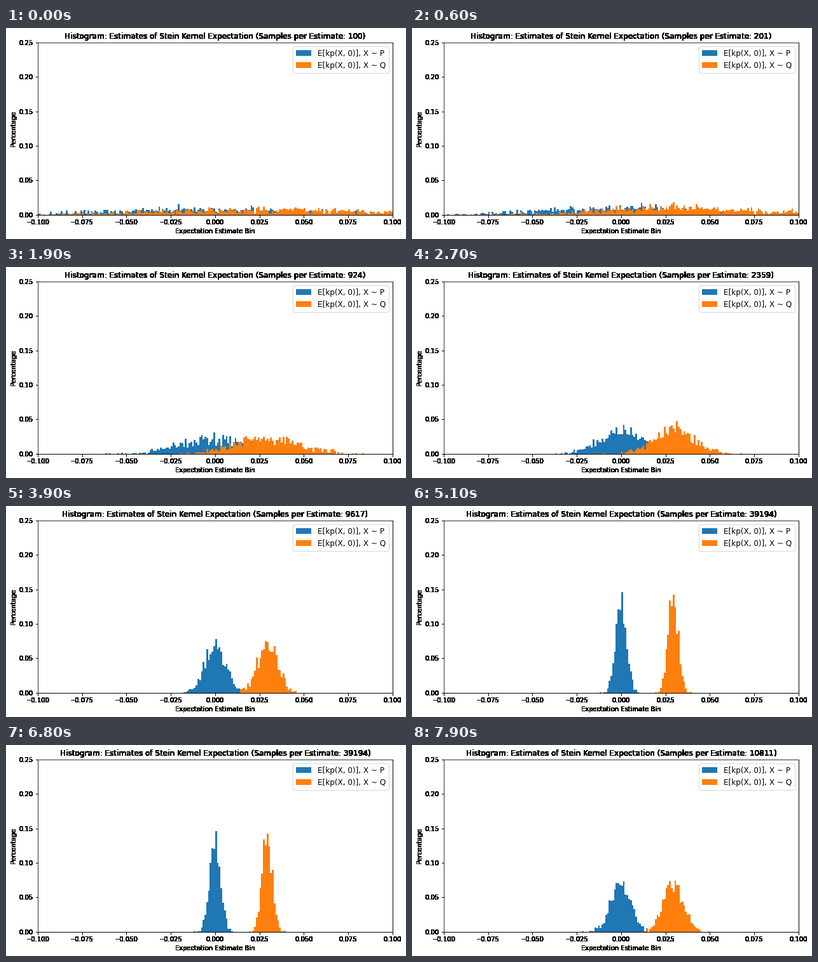
These frames come from a looping animation (629 px wide and 333 px high, 8 s). A matplotlib script:

```python
import numpy as np
import matplotlib.pyplot as plt
from matplotlib.animation import FuncAnimation

WIDTH, HEIGHT, DPI = 629, 333, 72
STEPS, FRAMES, INTERVAL = 60, 80, 100
ESTIMATES = 1000
EDGES = np.linspace(-0.1, 0.1, 201)
SAMPLES = np.logspace(2, 5, STEPS).astype(int)
# mean of the estimates, spread of a single sample
SERIES = {"P": (0.0, 0.585), "Q": (0.0294, 0.565)}

plt.rcParams.update({"font.family": "DejaVu Sans", "font.size": 10})


def harden(image, dpi):
    """Turn every touched pixel solid black."""
    hard = np.zeros_like(image)
    hard[..., 3] = image[..., 3] > 0
    return hard, 0, 0


def histogram(rng, mean, spread, samples):
    estimates = rng.normal(mean, spread / np.sqrt(samples), ESTIMATES)
    return np.histogram(estimates, EDGES)[0] / ESTIMATES


fig = plt.figure(figsize=(WIDTH / DPI, HEIGHT / DPI), dpi=DPI, facecolor="white")
ax = fig.add_axes([49.85 / WIDTH, 38.2 / HEIGHT, 558 / WIDTH, 271.8 / HEIGHT])
ax.set(xlim=(-0.1, 0.1), ylim=(0, 0.25),
       xlabel="Expectation Estimate Bin", ylabel="Percentage")
title = ax.set_title("")
bars = [ax.stairs(np.zeros(200), EDGES, fill=True, label=f"E[kp(X, 0)], X ~ {name}")
        for name in SERIES]
ax.legend(loc="upper right", fontsize=12)

for artist in (title, ax.xaxis, ax.yaxis, ax.spines["right"], ax.spines["bottom"]):
    artist.set_agg_filter(harden)


def update(frame):
    # the sample count grows to its maximum, then runs back
    step = min(frame, 2 * STEPS - 1 - frame)
    samples = SAMPLES[step]
    rng = np.random.default_rng(step)
    for bar, (mean, spread) in zip(bars, SERIES.values()):
        bar.set_data(histogram(rng, mean, spread, samples))
    title.set_text("Histogram: Estimates of Stein Kernel Expectation "
                   f"(Samples per Estimate: {samples})")
    return [*bars, title]


anim = FuncAnimation(fig, update, frames=FRAMES, interval=INTERVAL,
                     init_func=lambda: update(0), repeat=True, repeat_delay=0)
plt.show()
```
